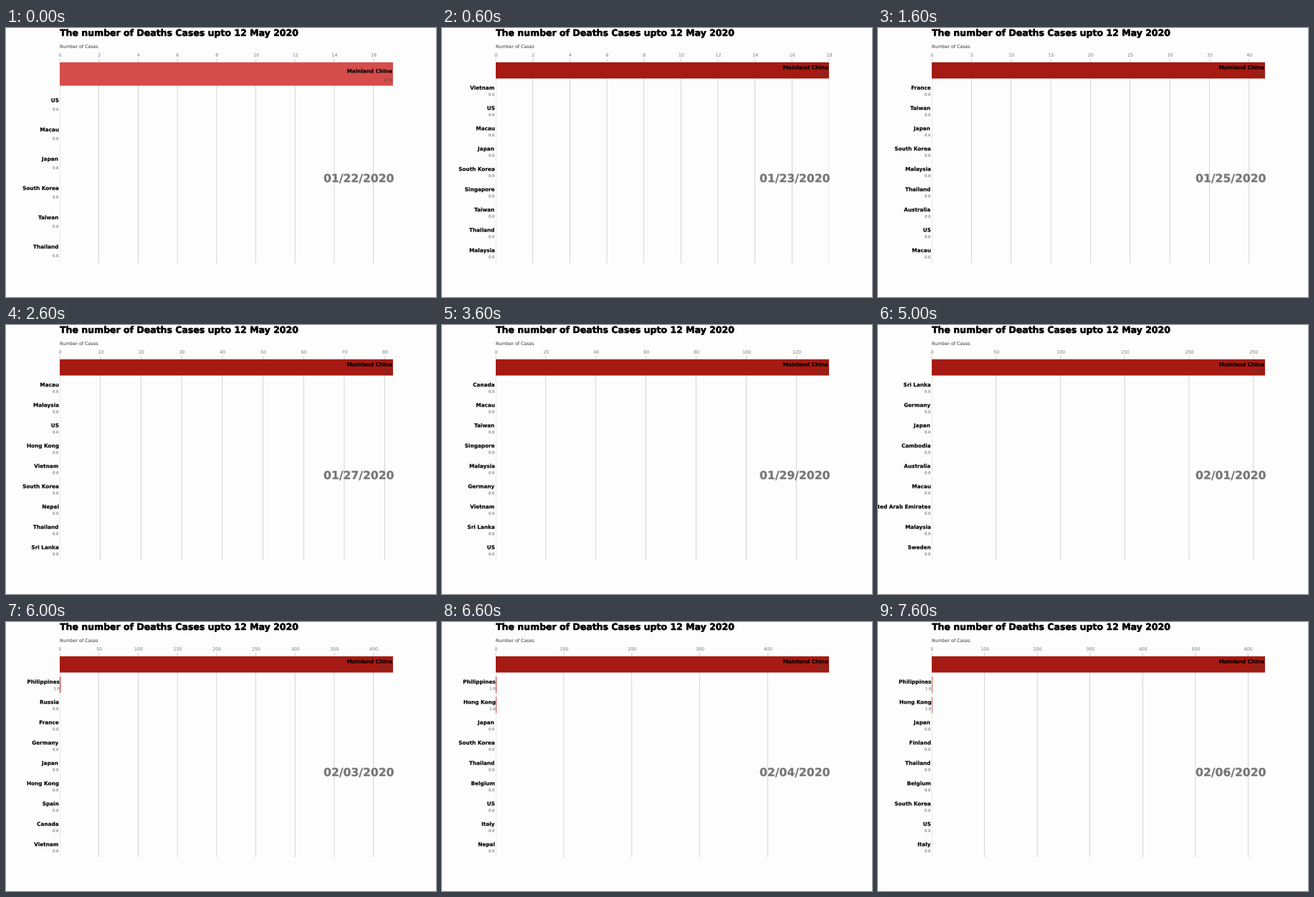
These frames come from a looping animation (600x375 px, 8000 ms). A matplotlib script:

```python
import matplotlib.pyplot as plt
from matplotlib.animation import FuncAnimation
from matplotlib.patches import PathPatch
from matplotlib.textpath import TextPath
from matplotlib.transforms import Affine2D

W, H, DPI = 600, 375, 37.5
PT = DPI / 72  # pixels per point
STEP_MS, N_FRAMES = 200, 40
BG, GREY = "#fefdfe", "#777777"
DESCENT = 3  # points below the baseline for bottom-aligned text
LEADER = "Mainland China"

# bar colours from the bottom row up
COLORS = ["#fbe3d9", "#f8cdbf", "#f3b3a4", "#ec9587", "#e57c70",
          "#dd645c", "#d54d4a", "#c53c37", "#b52b25", "#a51a12"]

# leader's total per day
TOTALS = [17, 18, 26, 42, 56, 82, 131, 133,
          171, 213, 259, 361, 425, 490, 562, 632]

# the other rows per day, top to bottom
OTHERS = [row.split(",") for row in (
    "US,Macau,Japan,South Korea,Taiwan,Thailand",
    "Vietnam,US,Macau,Japan,South Korea,Singapore,Taiwan,Thailand,Malaysia",
    "Japan,Macau,Taiwan,South Korea,US,Singapore,Thailand,Vietnam,France",
    "France,Taiwan,Japan,South Korea,Malaysia,Thailand,Australia,US,Macau",
    "Thailand,US,Macau,Japan,South Korea,Taiwan,Nepal,France,Malaysia",
    "Macau,Malaysia,US,Hong Kong,Vietnam,South Korea,Nepal,Thailand,Sri Lanka",
    "Taiwan,Germany,Japan,South Korea,Canada,Macau,Thailand,Nepal,Cambodia",
    "Canada,Macau,Taiwan,Singapore,Malaysia,Germany,Vietnam,Sri Lanka,US",
    "Japan,Philippines,Macau,Thailand,Germany,India,Taiwan,Nepal,Finland",
    "Thailand,Sweden,Japan,Hong Kong,Italy,Macau,US,Russia,Sri Lanka",
    "Sri Lanka,Germany,Japan,Cambodia,Australia,Macau,United Arab Emirates,"
    "Malaysia,Sweden",
    "Philippines,Japan,Thailand,South Korea,Germany,Macau,Spain,US,Vietnam",
    "Philippines,Russia,France,Germany,Japan,Hong Kong,Spain,Canada,Vietnam",
    "Philippines,Hong Kong,Japan,South Korea,Thailand,Belgium,US,Italy,Nepal",
    "Philippines,Hong Kong,Thailand,Japan,South Korea,Sweden,Macau,Spain,US",
    "Philippines,Hong Kong,Japan,Finland,Thailand,Belgium,South Korea,US,Italy",
)]

# first day with one case outside the leader
FIRST_CASE = {"Philippines": 11, "Hong Kong": 13}

# share of the text width left of the anchor
ALIGN = {"left": 0, "center": 0.5, "right": 1}

fig, ax = plt.subplots(figsize=(W / DPI, H / DPI), dpi=DPI, facecolor=BG)
fig.subplots_adjust(left=0.125, right=0.9, bottom=0.125, top=0.88)


def date_label(day):
    d = 22 + day
    return f"01/{d:02d}/2020" if d <= 31 else f"02/{d - 31:02d}/2020"


def rows(day):
    """Names and values from the bottom row up."""
    names = [LEADER] + OTHERS[day]
    values = [TOTALS[day]]
    values += [float(day >= FIRST_CASE.get(n, 99)) for n in OTHERS[day]]
    return names[::-1], values[::-1]


def put(coords, x, y, text, size, color="black", bold=False,
        ha="left", lift=0):
    """Draw text as outlines, so that it keeps sub-pixel positions."""
    prop = {"family": "DejaVu Sans", "weight": "bold" if bold else "normal"}
    path = TextPath((0, 0), text, size=size, prop=prop)
    px, py = coords.transform((x, y))
    px -= ALIGN[ha] * path.get_extents().width * PT
    place = Affine2D().scale(PT).translate(px, py + lift * PT)
    ax.add_artist(PathPatch(path, transform=place, facecolor=color,
                            edgecolor=color,
                            linewidth=0.02 * size if bold else 0,
                            clip_on=False, snap=False, zorder=3))


def draw_chart(day):
    ax.clear()
    ax.set_frame_on(False)
    names, values = rows(day)
    ax.barh(range(len(names)), values, color=COLORS[:len(names)], snap=False)
    ax.margins(0, 0.01)
    ax.set_yticks([])
    ax.xaxis.set_ticks_position("top")
    ax.tick_params(axis="x", colors=GREY, labelsize=12, labeltop=False)
    ax.grid(which="major", axis="x", linestyle="-", linewidth=1, snap=False)
    ax.set_axisbelow(True)

    right = ax.get_xlim()[1]
    ax.get_ylim()
    data, axes = ax.transData, ax.transAxes

    dx = TOTALS[day] / 200
    for i, (name, value) in enumerate(zip(names, values)):
        put(data, value - dx, i, name, 14, bold=True, ha="right",
            lift=DESCENT)
        put(data, value - dx, i - 0.25, f"{value:.1f}", 10, "#444444",
            ha="right")

    for t in ax.get_xticks():
        if 0 <= t <= right:
            put(axes, t / right, 1, f"{t:,.0f}", 12, GREY, ha="center",
                lift=7 + DESCENT)

    put(axes, 1, 0.4, date_label(day), 30, GREY, bold=True, ha="right")
    for _ in range(2):  # doubled for a heavier edge
        put(axes, 0, 1.06, "Number of Cases", 12, GREY)
        put(axes, 0, 1.12, "The number of Deaths Cases upto 12 May 2020",
            24, bold=True)


def update(frame):
    # days last 600 and 400 ms in turn
    draw_chart(2 * frame // 5)
    return []


anim = FuncAnimation(fig, update, frames=N_FRAMES, interval=STEP_MS,
                     repeat=True, repeat_delay=0, blit=False)
plt.show()
```
